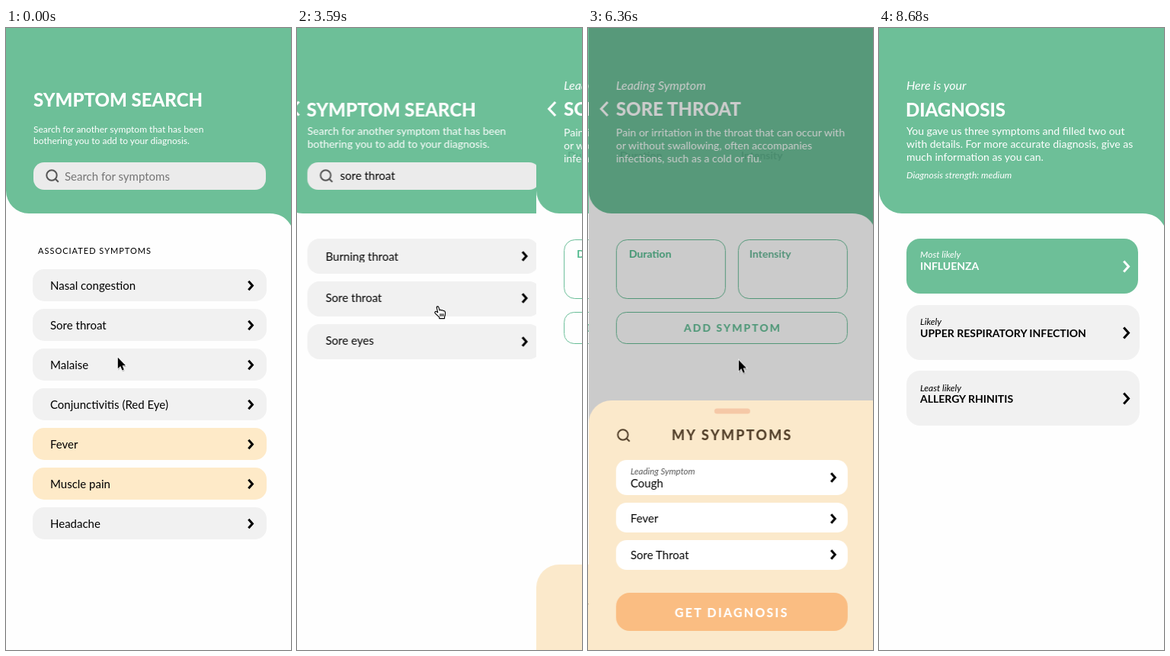
These frames come from a looping animation (374 by 815 pixels, 9.1 s). An HTML page:

```html
<!DOCTYPE html>
<html lang="en">
<head>
<meta charset="utf-8">
<title>Symptom search</title>
<style>
html, body { margin: 0; width: 100%; height: 100%; overflow: hidden; background: #fefefe; }
svg { display: block; width: 374px; height: 815px; font: 15px Lato, sans-serif; }
.paper { fill: #fefefe; }
.green { fill: #6dbf98; }
.cream { fill: #fbe9cb; }
.bar { fill: #ebebeb; }
.row { fill: #f1f1f1; }
.warm { fill: #feeac8; }
.white { fill: #fff; }
.h1 { font-size: 24px; font-weight: 800; fill: #fff; }
.lead { font-size: 16px; font-style: italic; fill: #fff; }
.body { font-size: 14px; fill: #fff; }
.small { font-size: 12px; fill: #fff; }
.note { font-size: 12px; font-style: italic; }
.bold { font-size: 14px; font-weight: 700; }
.cap { font-size: 11px; letter-spacing: 1px; }
.panel { font-size: 18px; font-weight: 800; letter-spacing: 2.2px; fill: #54412b; }
.add { font-size: 14px; font-weight: 800; letter-spacing: 2px; fill: #62bd95; }
.cta { font-size: 16px; font-weight: 800; letter-spacing: 2.2px; fill: #fff; }
.ghost { fill: #5cae89; }
.box { fill: #fefefe; stroke: #67bd96; }
.line { fill: none; stroke-width: 3; }

.page, .content, #cursor, #arrow, #hand { animation: 9100ms linear infinite; }
#results { animation-name: results; }
#detail { animation-name: detail; }
#list { animation-name: list; }
#diagnosis { animation-name: diagnosis; }
.content { animation-name: content; animation-timing-function: step-end; }
#cursor { animation-name: cursor; }
#arrow { animation-name: arrow; animation-timing-function: step-end; }
#hand { animation-name: hand; animation-timing-function: step-end; }

@keyframes results {
  0% { transform: translateX(374px); animation-timing-function: step-end; }
  21.54% { transform: none; }
  38.24% { transform: none; animation-timing-function: ease-in-out; }
  42.64%, 100% { transform: translateX(-140px); }
}
@keyframes detail {
  0% { transform: translateX(374px); }
  38.24% { transform: translateX(374px); animation-timing-function: ease-in-out; }
  42.64% { transform: none; }
  65.55% { transform: none; animation-timing-function: ease-in-out; }
  70.05%, 100% { transform: translateX(-140px); }
}
@keyframes list {
  0% { transform: translateX(374px); }
  65.55% { transform: translateX(374px); animation-timing-function: ease-in-out; }
  70.05% { transform: none; }
  86.35% { transform: none; animation-timing-function: ease-in-out; }
  91.2%, 100% { transform: translateX(-140px); }
}
@keyframes diagnosis {
  0% { transform: translateX(374px); }
  86.35% { transform: translateX(374px); animation-timing-function: ease-in-out; }
  91.2%, 100% { transform: none; }
}
@keyframes content {
  0% { opacity: 0; }
  87.69%, 100% { opacity: 1; }
}
@keyframes cursor {
  0%, .3% { transform: translate(146px, 431px); }
  3.63% { transform: translate(118px, 541px); }
  7.14% { transform: translate(81px, 430px); }
  10.66%, 10.99% { transform: translate(109px, 323px); }
  13.85%, 15.93% { transform: translate(81px, 231px); }
  18.9%, 28.13% { transform: translate(104px, 200px); }
  28.68% { transform: translate(104px, 231px); }
  32.42%, 33.85% { transform: translate(84px, 345px); }
  36.92%, 46.59% { transform: translate(180px, 364px); }
  49.12%, 59.23% { transform: translate(180px, 411px); }
  64.73%, 66.04% { transform: translate(218px, 399px); }
  69.89% { transform: translate(197px, 434px); }
  79.78%, 92.97% { transform: translate(188px, 768px); }
  95.38%, 100% { transform: translate(282px, 818px); }
}
@keyframes arrow {
  0%, 28.6%, 67.5%, 93% { opacity: 1; }
  18.2%, 32%, 79.2% { opacity: 0; }
}
@keyframes hand {
  0%, 28.6%, 67.5%, 93% { opacity: 0; }
  18.2%, 32%, 79.2% { opacity: 1; }
}
</style>
</head>
<body>
<svg viewBox="0 0 374 815">
  <defs>
    <rect id="paper" class="paper" width="374" height="815"/>
    <path id="head" class="green" d="M0 0H374V259C368 249 360 243 346 243H30A30 30 0 0 1 0 213Z"/>
    <path id="next" class="line" d="M-2.7-5.7L2.4 0L-2.7 5.7"/>
    <path id="open" class="line" d="M-3.3-7L3 0L-3.3 7"/>
    <path id="back" class="line" stroke="#fff" d="M25 97L16.5 106L25 115"/>
    <g id="lens" fill="none" stroke-width="2">
      <circle r="6.7"/>
      <path d="M4.8 4.8L8.8 8.8"/>
    </g>
    <rect id="item" x="35" width="307" height="42" rx="15"/>
    <g id="search">
      <rect class="bar" x="36" y="176" width="305" height="36" rx="14"/>
      <use href="#lens" x="60" y="193" stroke="#555"/>
    </g>
    <g id="symptom">
      <use href="#paper"/>
      <use href="#head"/>
      <use href="#back"/>
      <g class="bold ghost">
        <text x="41" y="172">Duration</text>
        <text x="200" y="172">Intensity</text>
      </g>
      <text class="lead" x="36" y="81">Leading Symptom</text>
      <text class="h1" x="36" y="115">SORE THROAT</text>
      <g class="body">
        <text x="36" y="142">Pain or irritation in the throat that can occur with</text>
        <text x="36" y="159">or without swallowing, often accompanies</text>
        <text x="36" y="176">infections, such as a cold or flu.</text>
      </g>
      <rect class="box" x="36.5" y="277.5" width="143" height="77" rx="14"/>
      <rect class="box" x="196.5" y="277.5" width="143" height="77" rx="14"/>
      <rect class="box" x="36.5" y="372.5" width="303" height="41" rx="13"/>
      <text class="bold" x="53" y="301" fill="#4fb98c">Duration</text>
      <text class="bold" x="211" y="301" fill="#62b593">Intensity</text>
      <text class="add" x="125" y="398">ADD SYMPTOM</text>
    </g>
  </defs>

  <g id="home">
    <use href="#paper"/>
    <use href="#head"/>
    <text class="h1" x="36" y="103">SYMPTOM SEARCH</text>
    <g class="small">
      <text x="36" y="137">Search for another symptom that has been</text>
      <text x="36" y="152">bothering you to add to your diagnosis.</text>
    </g>
    <use href="#search"/>
    <text x="77" y="200" fill="#757575">Search for symptoms</text>
    <text class="cap" x="42" y="296">ASSOCIATED SYMPTOMS</text>
    <g class="row">
      <use href="#item" y="316"/>
      <use href="#item" y="368"/>
      <use href="#item" y="420"/>
      <use href="#item" y="472"/>
      <use href="#item" y="628"/>
    </g>
    <g class="warm">
      <use href="#item" y="524"/>
      <use href="#item" y="576"/>
    </g>
    <text x="58" y="343">Nasal congestion</text>
    <text x="58" y="395">Sore throat</text>
    <text x="58" y="447">Malaise</text>
    <text x="58" y="499">Conjunctivitis (Red Eye)</text>
    <text x="58" y="551">Fever</text>
    <text x="58" y="603">Muscle pain</text>
    <text x="58" y="655">Headache</text>
    <g stroke="#000">
      <use href="#next" x="321" y="337.5"/>
      <use href="#next" x="321" y="389.5"/>
      <use href="#next" x="321" y="441.5"/>
      <use href="#next" x="321" y="493.5"/>
      <use href="#next" x="321" y="545.5"/>
      <use href="#next" x="321" y="597.5"/>
      <use href="#next" x="321" y="649.5"/>
    </g>
  </g>

  <g id="results" class="page">
    <use href="#paper"/>
    <use href="#head"/>
    <use href="#back" y="-.5"/>
    <text class="h1" x="35" y="115.5">SYMPTOM SEARCH</text>
    <g class="body">
      <text x="36" y="140">Search for another symptom that has been</text>
      <text x="36" y="157">bothering you to add to your diagnosis.</text>
    </g>
    <use href="#search"/>
    <text x="79" y="199">sore throat</text>
    <g class="row">
      <rect x="36" y="276" width="304" height="46" rx="16"/>
      <rect x="36" y="332" width="307" height="46" rx="16"/>
      <rect x="36" y="388" width="307" height="46" rx="16"/>
    </g>
    <text x="60" y="305">Burning throat</text>
    <rect class="row" x="58" y="307" width="60" height="4"/>
    <text x="60" y="359">Sore throat</text>
    <text x="60" y="415">Sore eyes</text>
    <g stroke="#000">
      <use href="#next" x="321" y="299"/>
      <use href="#next" x="321" y="354"/>
      <use href="#next" x="321" y="411"/>
    </g>
  </g>

  <g id="detail" class="page">
    <use href="#symptom"/>
    <path class="cream" d="M0 815V733A30 30 0 0 1 30 703H374V815Z"/>
    <rect x="165" y="713" width="47" height="7" rx="3.5" fill="#eac8ac"/>
    <text class="panel" x="109" y="768">MY SYMPTOMS</text>
  </g>

  <g id="list" class="page">
    <use href="#symptom"/>
    <rect width="374" height="815" opacity=".2"/>
    <path class="cream" d="M0 815V518A30 30 0 0 1 30 488H374V815Z"/>
    <rect x="165" y="498.5" width="47" height="7" rx="3.5" fill="#f5c8a7"/>
    <use href="#lens" x="45" y="533" stroke="#54412b"/>
    <text class="panel" x="109" y="540">MY SYMPTOMS</text>
    <g class="white">
      <rect x="36" y="566" width="304" height="46" rx="14"/>
      <rect x="36" y="622" width="304" height="39" rx="14"/>
      <rect x="36" y="671" width="304" height="39" rx="14"/>
    </g>
    <text class="note" x="55" y="585" fill="#555" style="font-size:11.5px">Leading Symptom</text>
    <text x="55" y="602">Cough</text>
    <text x="55" y="648">Fever</text>
    <text x="55" y="696">Sore Throat</text>
    <g stroke="#000">
      <use href="#next" x="321" y="589"/>
      <use href="#next" x="321" y="643"/>
      <use href="#next" x="321" y="690"/>
    </g>
    <rect x="36" y="740" width="304" height="50" rx="18" fill="#fabd82"/>
    <text class="cta" x="113" y="772">GET DIAGNOSIS</text>
  </g>

  <g id="diagnosis" class="page">
    <use href="#paper"/>
    <g class="content">
      <use href="#head"/>
      <text class="lead" x="36" y="81">Here is your</text>
      <text class="h1" x="35" y="115.5">DIAGNOSIS</text>
      <g class="body">
        <text x="36" y="140">You gave us three symptoms and filled two out</text>
        <text x="36" y="157">with details. For more accurate diagnosis, give as</text>
        <text x="36" y="174">much information as you can.</text>
      </g>
      <text class="note white" x="36" y="197">Diagnosis strength: medium</text>
      <rect class="green" x="36" y="276" width="304" height="72" rx="18"/>
      <rect class="row" x="36" y="363" width="306" height="72" rx="18"/>
      <rect class="row" x="36" y="449" width="306" height="72" rx="18"/>
      <g class="white">
        <text class="note" x="54" y="301">Most likely</text>
        <text class="bold" x="54" y="317">INFLUENZA</text>
      </g>
      <text class="note" x="54" y="389">Likely</text>
      <text class="bold" x="54" y="405">UPPER RESPIRATORY INFECTION</text>
      <text class="note" x="54" y="476">Least likely</text>
      <text class="bold" x="54" y="491">ALLERGY RHINITIS</text>
      <use href="#open" x="324.5" y="312.5" stroke="#fff"/>
      <g stroke="#000">
        <use href="#open" x="324.5" y="399.5"/>
        <use href="#open" x="324.5" y="485.5"/>
      </g>
    </g>
  </g>

  <g id="cursor">
    <g id="arrow">
      <path d="M1 2V17.5L4.7 14L7 19.3L9.7 18.2L7.4 13H12Z" opacity=".22"/>
      <path d="M.8 .8V15.3L4.2 12.1L6.5 17.4L8.8 16.4L6.6 11.2H11Z" stroke="#fff" stroke-width="1.4" paint-order="stroke"/>
    </g>
    <g id="hand" stroke="#000" stroke-width="1.1" stroke-linejoin="round">
      <path fill="#fff" d="M3.2 1.9C3.6 .5 5.4 .5 5.9 1.9L7.2 6C7.6 5 9.2 5 9.6 6.2C10.2 5.4 11.6 5.6 12 6.8C12.8 6.2 14.2 6.8 14.4 8.2C14.8 10.6 14.4 13 13.6 14.4V16.6H6.8V15.2C5 13.2 3 11.6 1.2 9.6C.3 8.2 1.7 7 3 7.6L4.8 8.8Z"/>
      <path d="M8 10.3V13.8M10 10.3V13.8M12 10.3V13.8"/>
    </g>
  </g>
</svg>
</body>
</html>
```
